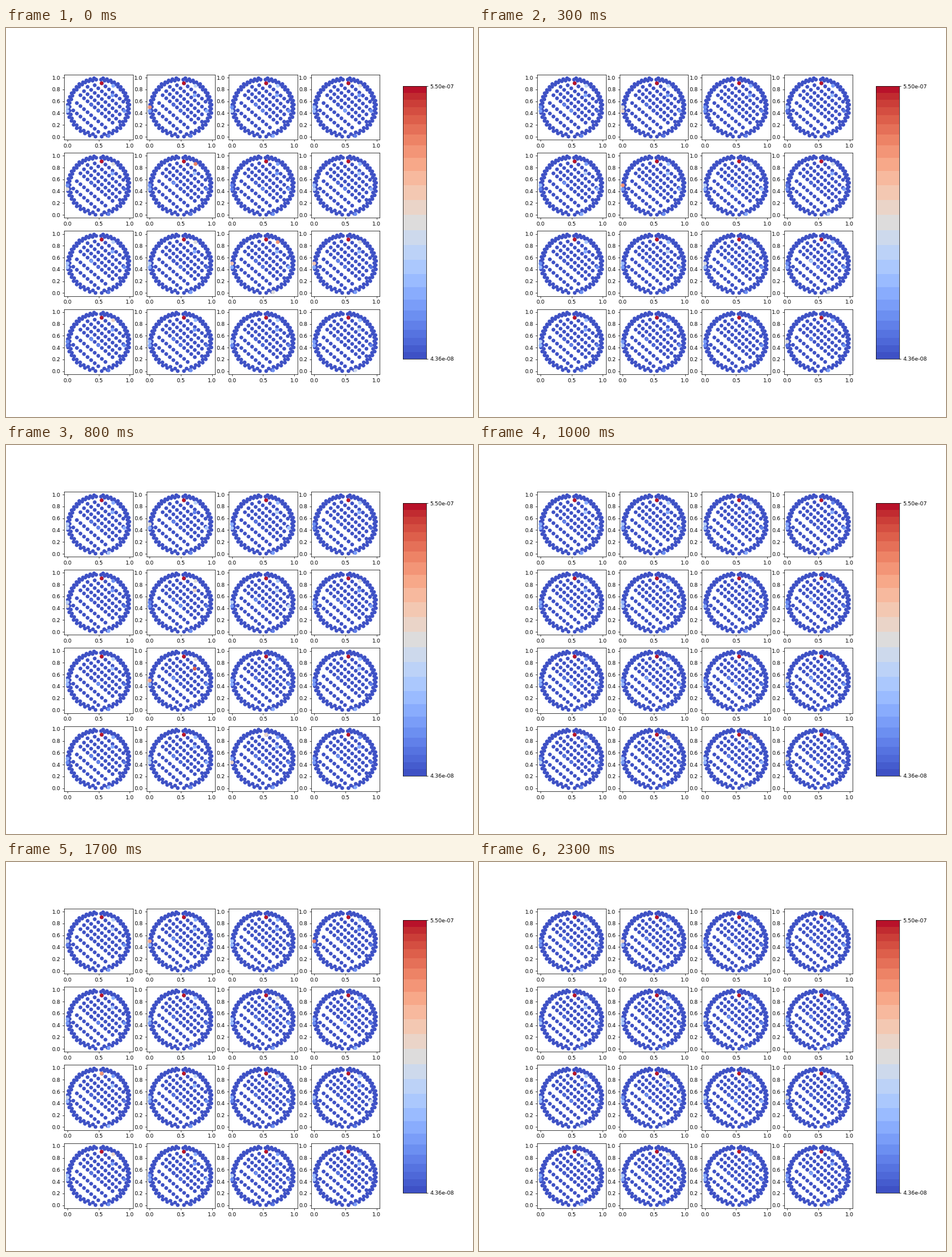
Animation, 820 px wide and 683 px high, one loop 2400 ms. Source, as a matplotlib script:

```python
import numpy as np
import matplotlib.pyplot as plt
from matplotlib.animation import FuncAnimation
from matplotlib.colors import BoundaryNorm, ListedColormap

FRAMES, STEP_MS, PANELS = 24, 100, 16
PITCH, SLOPE = 0.0573, 0.9

plt.rcParams["font.family"] = "DejaVu Sans"

# Active sites: x, y, resting level, spread
SITES = np.array([
    (0.000, 0.500, .27, .50),
    (0.000, 0.435, .24, .40),
    (0.722, 0.700, .27, .35),
    (0.735, 0.862, .31, .40),
    (0.660, 0.015, .17, .50),
    (0.385, 0.540, .08, .60),
    (0.495, 0.440, .06, .60),
    (0.912, 0.438, .15, .50),
])
PEAK = (0.548, 0.905)


def diagonal_rows():
    """Parallel rows on shared columns, kept inside the rim."""
    x = 0.495 + PITCH * np.arange(-8, 9)
    heights = [.53, .706, .89, 1.01, 1.135, 1.265, 1.40]
    rows = [np.column_stack([x, h - SLOPE * x]) for h in heights]
    grid = np.vstack(rows)
    return grid[np.hypot(*(grid - .5).T) < .42]


def rim(rng, count=42):
    """Two mirrored arcs from bottom to top, zigzagging in depth."""
    turn = np.pi * np.linspace(.02, .97, count) ** .88
    radius = np.where(np.arange(count) % 2, .468, .497)
    radius = radius + rng.uniform(-.012, .003, count)
    x, y = radius * np.sin(turn), -radius * np.cos(turn)
    return .5 + np.vstack([np.column_stack([x, y]),
                           np.column_stack([-x, y])])


def activity(rng):
    """Each panel flickers on its own; the peak site stays near full."""
    shape = (FRAMES, PANELS, len(SITES))
    rest, spread = SITES[:, 2], SITES[:, 3]
    level = rest * np.exp(spread * rng.standard_normal(shape))
    dips = rng.random((FRAMES, PANELS, 1)) < .03
    peak = np.where(dips, rng.uniform(.4, .8, dips.shape), 1)
    return np.clip(np.concatenate([level, peak], axis=2), 0, 1)


def colour_steps(count=25):
    """Bands of the bar, widest around the middle."""
    t = np.linspace(0, 1, count + 1)
    edges = t - .4 * np.sin(2 * np.pi * t) / (2 * np.pi)
    mids = (edges[1:] + edges[:-1]) / 2
    cmap = ListedColormap(plt.get_cmap("coolwarm")(np.linspace(0, 1, count)
                                                   if count < 2 else mids))
    return edges, mids, cmap, BoundaryNorm(edges, count)


rng = np.random.default_rng(4)
still = np.vstack([diagonal_rows(), rim(rng)])
points = np.vstack([still, SITES[:, :2], PEAK])
levels = activity(rng)
edges, mids, cmap, norm = colour_steps()

fig, axes = plt.subplots(4, 4, figsize=(12, 9.996), dpi=205 / 3)
fig.subplots_adjust(left=0.1249, right=0.8)

dots = []
for ax in axes.flat:
    dots.append(ax.scatter(*points.T, c=np.zeros(len(points)),
                           cmap=cmap, norm=norm))
    ax.set(xlim=(-.05, 1.05), ylim=(-.05, 1.05),
           xticks=[0, .5, 1], yticks=np.linspace(0, 1, 6))

bar = fig.add_axes([0.85, 0.15, 0.05, 0.7])
bar.pcolormesh([0, 1], edges, mids[:, None], cmap=cmap, norm=norm)
bar.set(xticks=[], ylim=(0, 1))
bar.yaxis.tick_right()
bar.set_yticks([0, 1], ["4.36e-08", "5.50e-07"])


def update(i):
    for dot, level in zip(dots, levels[i]):
        dot.set_array(np.concatenate([np.zeros(len(still)), level]))
    return dots


anim = FuncAnimation(fig, update, frames=FRAMES, interval=STEP_MS,
                     repeat=True, repeat_delay=0, blit=False)
plt.show()
```
